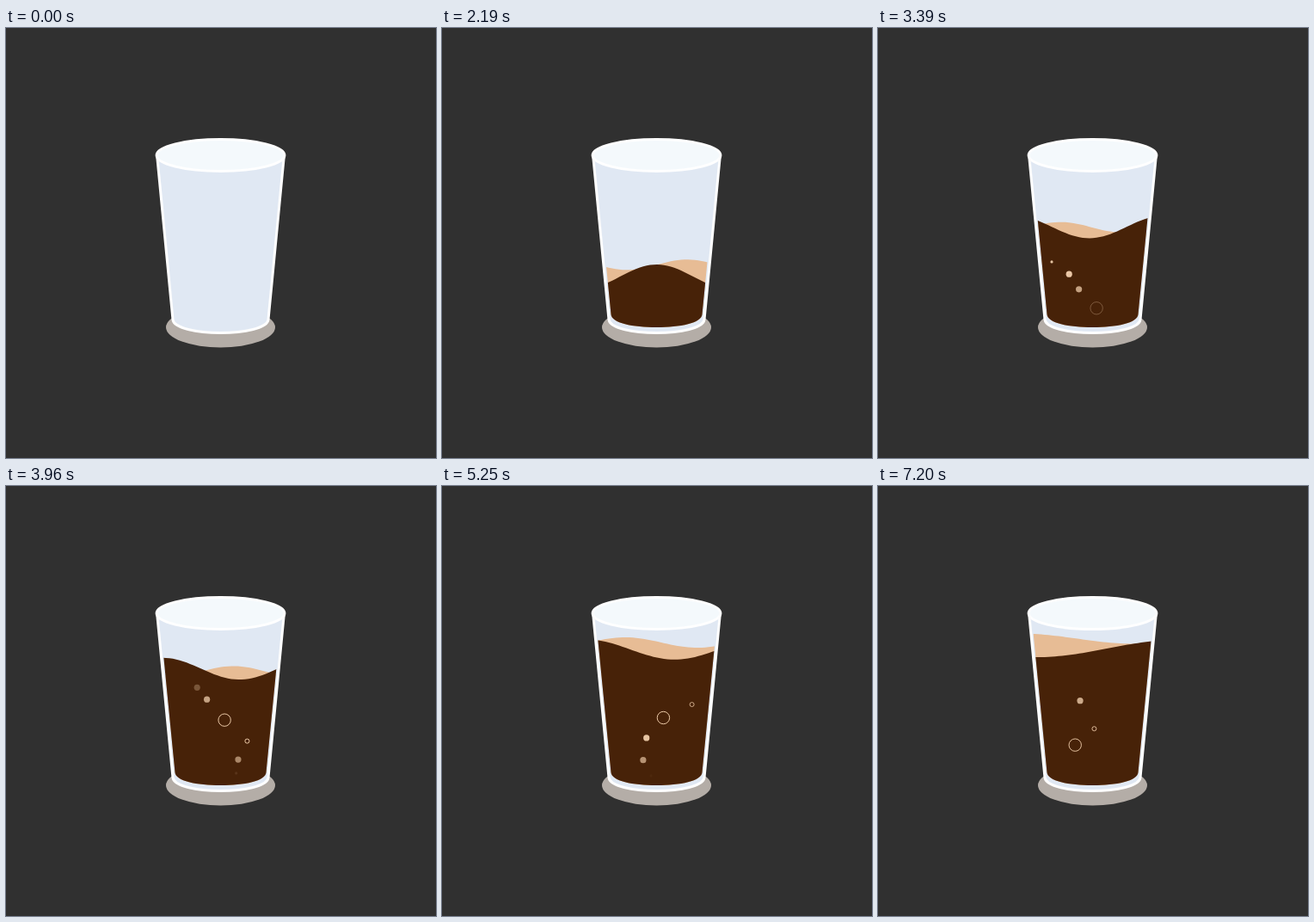
Animation of 500x500 px, one loop 7.23 s. Source, as an HTML page:

```html
<!DOCTYPE html>
<html lang="en">
<head>
<meta charset="utf-8">
<title>Filling glass</title>
<style>
  html, body { margin: 0; width: 100%; height: 100%; overflow: hidden; background: #303030; }
  svg { display: block; width: 100vw; height: 100vh; }
</style>
</head>
<body>
<svg viewBox="0 0 500 500">
  <defs>
    <clipPath id="inside">
      <path d="M178.5 150L196.5 333C197 343 222 348 249.5 348S302 343 302.5 333L320.5 150Z"/>
    </clipPath>
    <clipPath id="submerged"><path id="surface"/></clipPath>
  </defs>
  <ellipse cx="249.5" cy="348" rx="63.5" ry="23.5" fill="#b4ada7"/>
  <path d="M175.8 150L194 339C195 349 222 354.5 249.5 354.5S304 349 305 339L323.2 150Z"
    fill="#e0e8f3" stroke="#fff" stroke-width="3" stroke-linejoin="round"/>
  <g id="liquid" clip-path="url(#inside)">
    <path id="foam" fill="#e7bc95"/>
    <path id="drink" fill="#472208"/>
    <g id="bubbles" clip-path="url(#submerged)"></g>
  </g>
  <ellipse cx="249.5" cy="148" rx="74.4" ry="18.5" fill="#f4f9fc" stroke="#fff" stroke-width="3"/>
</svg>
<script>
const LOOP = 7.23, FRAME = .03, POUR = 1.02, FULL = 4.6;
const { PI, cos, sin, max, min, floor } = Math;
const $ = id => document.getElementById(id);

// Wave phase in cycles at the middle of the glass
const times = [1.56, 2.82, 3.96, 5.25, 6.39, 7.2];
const drinkPhase = [.335, -.33, -.62, -1.6, -2.365, -3.3];
const foamPhase = [-.13, -.37, -1.1, -1.78, -2.32, -2.68];

function lerpKeys(values, t) {
  let i = 0;
  while (i < times.length - 2 && t >= times[i + 1]) i++;
  const u = (t - times[i]) / (times[i + 1] - times[i]);
  return values[i] + (values[i + 1] - values[i]) * u;
}

function wave(level, amp, phase, length) {
  let d = "M170 370";
  for (let x = 170; x <= 330; x += 4) {
    const y = level - amp * cos(2 * PI * (phase + (x - 250) / length));
    d += `L${x} ${y.toFixed(2)}`;
  }
  return d + "L330 370Z";
}

let seed = 7;
const random = (from, to) => {
  seed = (seed * 16807) % 2147483647;
  return from + (to - from) * seed / 2147483647;
};

const bubbles = Array.from({ length: 20 }, (_, i) => {
  const el = document.createElementNS("http://www.w3.org/2000/svg", "circle");
  const ring = i % 5 > 2;
  const r = ring ? (i % 2 ? 7.2 : 2.5) : (i % 3 ? 3.6 : 1.6);
  el.setAttribute("r", r);
  el.setAttribute("fill", ring ? "none" : "#eccaa8");
  el.setAttribute("stroke", ring ? "#eccaa8" : "none");
  el.setAttribute("cx", random(202, 298));
  $("bubbles").append(el);
  return { el, born: 2.6 + i * .22, life: random(.9, 1.4), speed: random(75, 105) };
});

function moveBubble({ el, born, life, speed }, t) {
  const age = min(life, max(0, t - born));
  el.setAttribute("cy", 338 - speed * age);
  el.setAttribute("opacity", sin(PI * age / life));
}

function drawLiquid(t) {
  const s = t - POUR;
  const level = 189 + 180 * max(0, 1 - s / FULL) ** 2;
  const length = 170 + 160 * (s / 6.2) ** 4;
  const foamLevel = level - 7 + 10 * cos(2 * PI * (t - 3.96) / 4.8);
  const d = wave(level, 15 - .8 * s, lerpKeys(drinkPhase, t), length);
  $("drink").setAttribute("d", d);
  $("surface").setAttribute("d", d);
  $("foam").setAttribute("d", wave(foamLevel, 6, lerpKeys(foamPhase, t), length * .82));
  bubbles.forEach(b => moveBubble(b, t));
}

function draw() {
  const t = floor(performance.now() / 1000 % LOOP / FRAME) * FRAME;
  const pouring = t >= POUR;
  $("liquid").style.display = pouring ? "" : "none";
  if (pouring) drawLiquid(t);
  requestAnimationFrame(draw);
}
draw();
</script>
</body>
</html>
```
